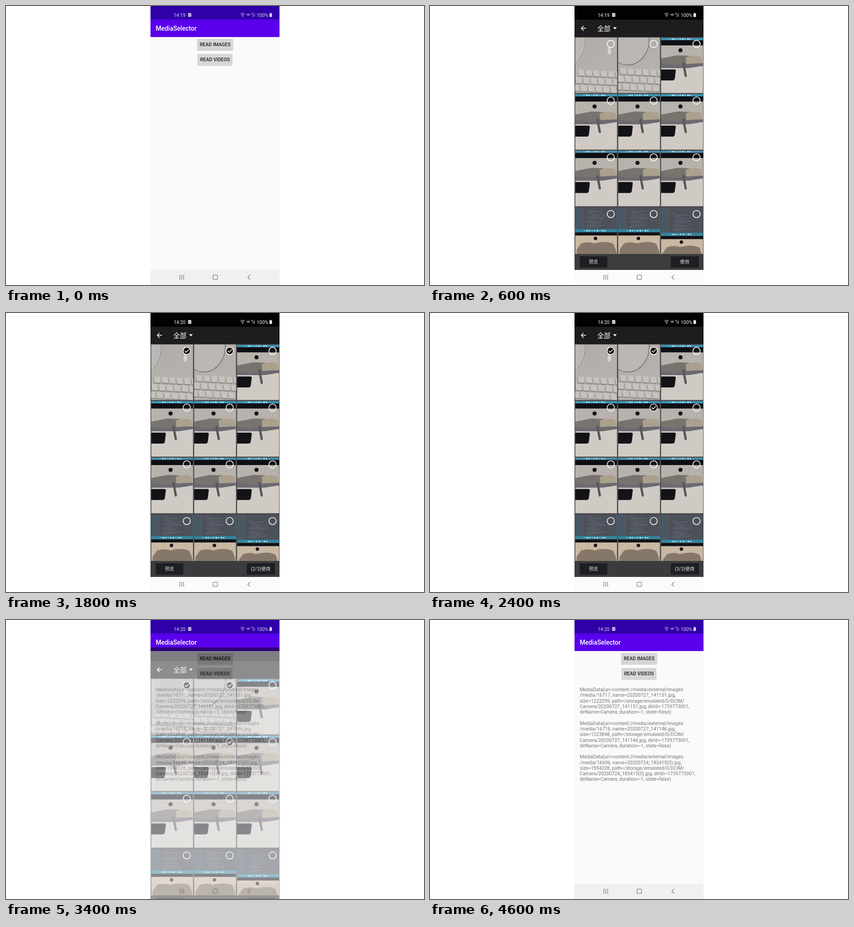
Recreate the animation shown at these times as an HTML page. Size 917x611 px, loop 4.8 s.

```html
<!DOCTYPE html>
<html lang="en">
<head>
<meta charset="utf-8">
<title>Media picker</title>
<style>
  html, body { margin: 0; width: 100%; height: 100%; overflow: hidden; background: #fff; }
  svg { display: block; }
  #stage { width: 100vw; height: 100vh; }
  text { font-family: Roboto, "Noto Sans CJK SC", "Noto Sans CJK", sans-serif; font-size: 10.5px; white-space: pre; }
  .mid { text-anchor: middle; }
  .line { fill: none; stroke-linecap: round; stroke-linejoin: round; }
</style>
</head>
<body>
<svg id="stage" viewBox="0 0 917 611"></svg>
<script>
const LOOP = 4800, STEP = 200;
const rect = (x, y, w, h, fill, more = '') =>
  `<rect x="${x}" y="${y}" width="${w}" height="${h}" fill="${fill}" ${more}/>`;
const text = (x, y, s, more = '') => `<text x="${x}" y="${y}" ${more}>${s}</text>`;
const path = (d, more = '') => `<path d="${d}" ${more}/>`;
const range = (n, f) => Array.from({ length: n }, (_, i) => f(i)).join('');

// Photos, each in a 92 x 122 box
const keys = (x, y) => `<g transform="translate(${x} ${y}) rotate(3) skewX(8)">` +
  range(3, r => range(7, c => {
    const kx = c * 16.5 - r * 7, ky = r * 17;
    return rect(kx - .8, ky + 1.5, 14.5, 13.5, '#85807b', 'rx="2"') +
      rect(kx, ky, 13.5, 13, '#c6c2bd', 'rx="2"');
  })) + '</g>';

const desk = rect(0, 0, 92, 122, 'url(#wall)');
const photoMouseEdge = desk +
  path('M0 0H22Q24 36 0 57Z', 'fill="#bab7b4"') +
  path('M22 0Q24 36 0 57', 'class="line" stroke="#8a8682"') +
  `<ellipse cx="75" cy="30" rx="4" ry="8" fill="#d6d3ce"/>` + keys(6, 70);
const photoMouse = desk +
  path('M0 0H68C71 32 48 60 22 60Q8 60 0 54Z', 'fill="#bab7b5"') +
  path('M68 0C71 32 48 60 22 60Q8 60 0 54', 'class="line" stroke="#6f6b68" stroke-width="1.5"') +
  keys(4, 67);

const dots = (y, x0) => range(9, i =>
  rect(x0 + i * 5.6, y, 2.6 + i % 2, 2.6, i % 3 ? '#d8eaf0' : '#56c3c9'));
const logo = (x, y, r = 4.6) => `<circle cx="${x}" cy="${y}" r="${r}" fill="#17161a"/>`;

const photoDesk = rect(0, 0, 92, 122, 'url(#table)') +
  rect(0, 0, 92, 5, '#3b93b6') + dots(1, 18) +
  rect(0, 5, 92, 11.5, '#0e0f14') +
  rect(0, 16.5, 92, 43, '#b7b2ac') +
  path('M0 45L20 41L36 38L62 39L56 57L50 63H0Z', 'fill="#77736f"') +
  path('M54 42Q72 36 88 41L91 53Q74 60 55 56Z', 'fill="#aaa08c"') +
  path('M0 56L30 60L54 57L92 55V61L60 66H0Z', 'fill="#6c6971"') +
  path('M0 69H29Q33 69 32 73L30 89Q29 93 25 93H0Z', 'fill="#131217"') +
  path('M49 56L54 83', 'class="line" stroke="#5a5659" stroke-width="5"') +
  logo(42.5, 27);

const code = range(12, i => {
  const x = 23 + i * 7 % 11, w = 13 + i * 17 % 29;
  return rect(x, 4 + i * 3.4, w, 1, i % 3 ? '#78808a' : '#75659c', 'opacity=".7"');
});
const photoScreen = rect(0, -10, 92, 132, '#c9b8a2') +
  rect(0, -10, 92, 58, '#4c5159') + rect(0, -10, 11, 58, '#455a68') +
  rect(11, -10, 8, 58, '#50575f') + code +
  rect(0, 46.5, 92, 7, '#32849f') + dots(48.8, 19) +
  rect(0, 53.5, 92, 7, '#111217') +
  path('M3 92L13 78Q28 73 42 78Q68 71 84 79L90 95V110H3Z', 'fill="#85786a"') +
  logo(44.5, 67, 3.8);

const COLS = [318.5, 412.7, 507], ROWS = [69, 193, 317.5, 442];
const tile = (i) => {
  const row = Math.floor(i / 3), col = i % 3;
  const kind = row == 3 ? 'screen' : i == 0 ? 'edge' : i == 1 ? 'mouse' : 'desk';
  const dy = row == 3 ? (col == 2 ? 8 : 0) : i == 2 ? 1 : row == 2 ? -1 : 0;
  return `<svg x="${COLS[col]}" y="${ROWS[row]}" width="92" height="${row == 3 ? 101 : 121.6}" overflow="hidden">
    <use href="#${kind}" y="${dy}"/></svg>`;
};
const marker = (i) => {
  const x = 396.6 + i % 3 * 94.1, y = 83 + Math.floor(i / 3) * 124.2;
  return `<g transform="translate(${x} ${y})"><circle r="7.9" fill="none" stroke="#fff" stroke-width="1.6"/>
    <g id="tick${i}"><circle r="7.2" fill="#111"/>` +
    path('M-4 .2L-1.2 3L4.2 -2.8', 'class="line" stroke="#fff" stroke-width="1.5"') + '</g></g>';
};

const status = `<g id="status">
  ${text(368, 23.5, '', 'id="clock" style="font-size:10.4px"')}
  ${rect(399.5, 15.5, 7, 8, 'currentColor', 'rx="1"')}
  ${path('M401 19.3L402.6 21L405.2 17.8', 'class="line" id="mark" stroke-width="1"')}
  <g class="line" stroke="currentColor">
    ${path('M514.5 17.5Q519 13.8 523.5 17.5M516.2 19.6Q519 17.4 521.8 19.6')}
  </g>
  <circle cx="519" cy="22" r="1.2"/>
  ${text(528, 21, 'HD', 'style="font-size:5px;font-weight:700"')}
  ${text(537, 19, '4G', 'style="font-size:5px"')}
  ${path('M541 23.5V21.5M543 23.5V19M545.3 23.5V16', 'stroke="currentColor" stroke-width="1.1" opacity=".7"')}
  ${text(550, 23.5, '100%', 'style="font-size:10.4px"')}
  ${path('M578 16.5H579.5V15H582V16.5H583.5V24H578Z')}
</g>`;

const nav = `<g class="line" stroke="#7d7d7f" stroke-width="1.3">
  ${path('M381.5 589V599M385.6 589V599M389.7 589V599')}
  <rect x="454.2" y="589.2" width="9.8" height="9.6" rx="2.6"/>
  ${path('M535.3 589.3L530.4 594L535.3 598.7')}</g>`;

const button = (x, y, w, label, id) =>
  rect(x - .3, y + .5, w + .6, 25.6, '#000', 'rx="1.5" opacity=".16"') +
  rect(x, y, w, 25, '#d6d6d7', `rx="1.2" id="${id}"`) +
  text(x + w / 2, y + 16.4, label, 'class="mid" fill="#202022" style="font-weight:500"');

const media = [[16717, '20200727_141151', 1222299], [16716, '20200727_141146', 1223848],
  [16696, '20200724_183415(0)', 1954328]];
const log = media.flatMap(([id, name, size]) => [
  'MediaData(uri=content://media/external/images', `/media/${id}, name=${name}.jpg,`,
  `size=${size}, path=/storage/emulated/0/DCIM/`, `Camera/${name}.jpg, dirId=-1739773001,`,
  'dirName=Camera, duration=-1, state=false)', '']);

const home = rect(317, 0, 283, 611, '#fafafc') +
  rect(317, 0, 283, 30, '#2f00a7') + rect(317, 29.5, 283, 38.5, '#5a00eb') +
  text(328.5, 54, 'MediaSelector', 'fill="#fff" style="font-size:13.85px;font-weight:500"') +
  button(419.5, 72, 78.5, 'READ IMAGES', 'images') + button(420.5, 105, 76, 'READ VIDEOS', 'videos') +
  `<g id="log" fill="#757575">${log.map((s, i) => text(328.5, 156 + i * 12.28, s)).join('')}</g>` +
  rect(317, 578, 283, 33, '#f0f0f1') + nav;

const picker = `<g id="picker">
  ${rect(317, 0, 283, 611, '#4a4a4c')}${rect(317, 0, 283, 30, '#020204')}
  ${rect(317, 30, 283, 38, '#1e1c1e')}
  ${path('M342 48.8H332.2M336.6 44L331.8 48.8L336.6 53.6', 'class="line" stroke="#fff" stroke-width="1.5"')}
  ${text(367, 54.8, '全部', 'fill="#fff" style="font-size:14.5px"')}
  ${path('M401.5 46.5H410L405.75 51Z', 'fill="#fff"')}
  <g id="photos">${range(12, tile)}</g>${range(12, marker)}
  ${rect(317, 543, 283, 35, '#3c3c3f')}
  ${rect(328.5, 548, 60.5, 25, '#1e1f22', 'rx="2"')}${rect(528, 548, 62, 25, '#1e1f22', 'rx="2"')}
  <g class="mid" fill="#e8e8e8">${text(358.5, 564.2, '预览', 'style="font-size:10px"')}
  ${text(558.7, 564.2, '', 'id="count" style="font-size:10.2px"')}</g>
  ${rect(317, 578, 283, 33, '#fbfbfb')}${nav}</g>`;

const toast = `<g id="toast">${rect(408, 505, 102.5, 28, '#515154', 'rx="13"')}
  ${text(458.8, 522.7, '最多可选择 3 个', 'class="mid" fill="#e4e4e4" style="font-size:10.2px"')}</g>`;

const gradient = (id, a, b) => `<linearGradient id="${id}" x2=".3" y2="1">
  <stop stop-color="${a}"/><stop offset="1" stop-color="${b}"/></linearGradient>`;
const stage = document.getElementById('stage');
stage.innerHTML = `<defs>${gradient('wall', '#b0adaa', '#b7b3ad')}${gradient('table', '#d0cbca', '#cfcac3')}
  <clipPath id="phone"><rect x="317" width="283" height="611"/></clipPath>
  <g id="edge">${photoMouseEdge}</g><g id="mouse">${photoMouse}</g>
  <g id="desk">${photoDesk}</g><g id="screen">${photoScreen}</g></defs>
  <g clip-path="url(#phone)">${home}${picker}${toast}${status}
  ${rect(317, 610, 283, 1, '#111', 'id="rim"')}</g>`;

const $ = id => document.getElementById(id);
const show = (id, on) => $(id).style.display = on ? '' : 'none';
const picks = [[0, 1000], [1, 1400], [4, 2000]];

function draw(t) {
  const opening = t >= 400 && t < 600, closing = t >= 3400 && t < 3600;
  const full = t >= 600 && t < 3400, moving = opening || closing;
  show('picker', full || moving);
  show('photos', !opening);
  show('log', t >= 3400);
  show('rim', opening);
  $('picker').setAttribute('transform', `translate(0 ${opening ? 137.5 : closing ? 60 : 0})`);
  $('picker').setAttribute('opacity', moving ? .49 : 1);
  $('images').setAttribute('fill', opening ? '#bebdc0' : '#d6d6d7');

  for (let i = 0; i < 12; i++) show('tick' + i, picks.some(([n, at]) => n == i && t >= at));
  const n = picks.filter(([, at]) => t >= at).length;
  $('count').textContent = n ? `(${n}/3)使用` : '使用';

  show('toast', t >= 2600 && t < 3400);
  $('toast').setAttribute('opacity', t < 2800 ? .6 : t < 3200 ? .95 : .72);

  $('clock').textContent = t < 1800 ? '14:19' : '14:20';
  $('status').setAttribute('fill', full ? '#f2f2f2' : '#d9d0f2');
  $('status').style.color = full ? '#f2f2f2' : '#d9d0f2';
  $('mark').setAttribute('stroke', full ? '#020204' : '#2f00a7');
}

const start = performance.now();
function tick() {
  const t = (performance.now() - start) % LOOP;
  draw(Math.floor(t / STEP) * STEP);
  requestAnimationFrame(tick);
}
tick();
</script>
</body>
</html>
```
